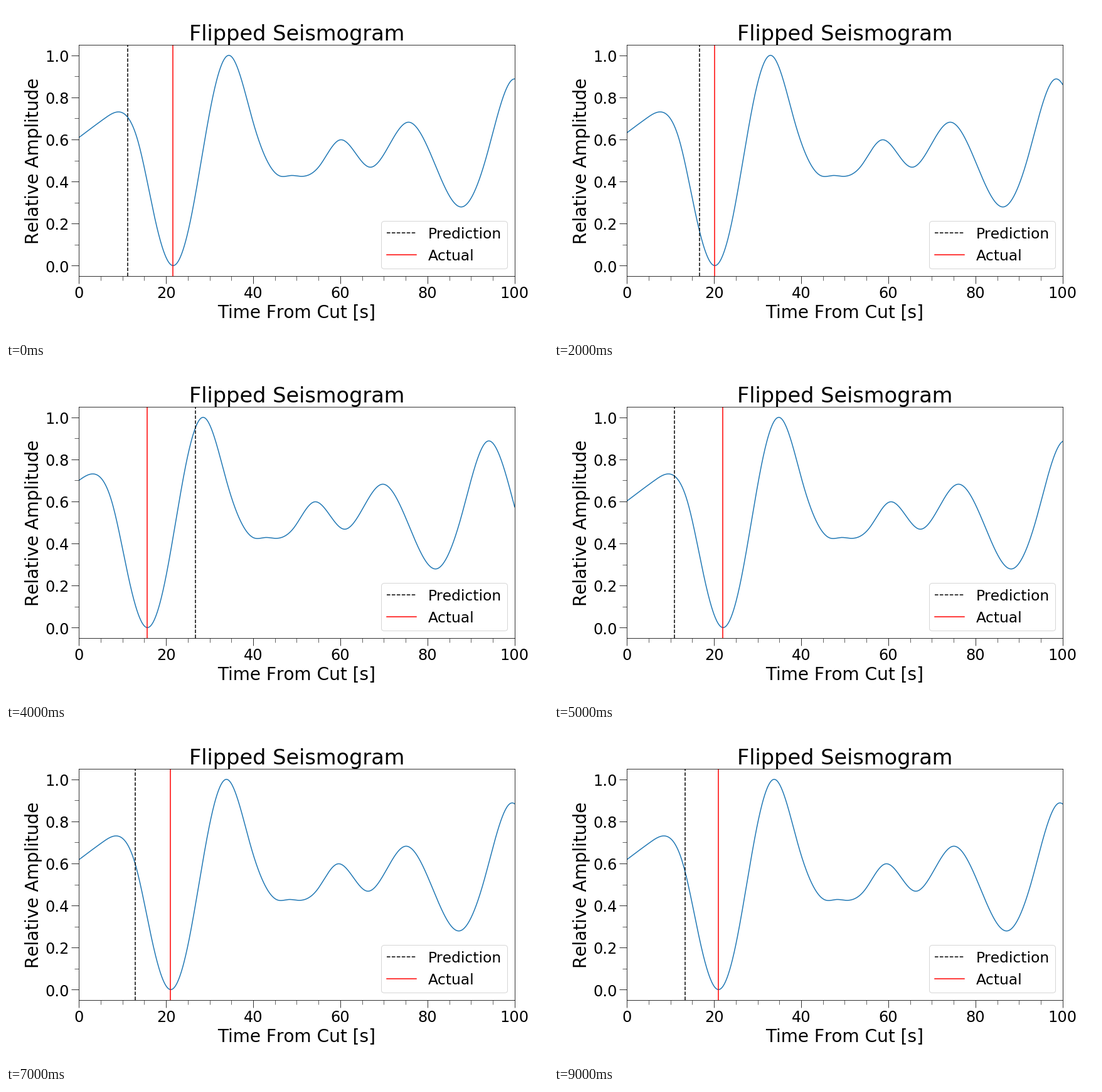
Recreate the animation shown at these times as a matplotlib script. Size 864 px wide and 533 px high, loop 10 s.

```python
import numpy as np
import matplotlib.pyplot as plt
from matplotlib.animation import FuncAnimation
from matplotlib.text import Text
from matplotlib.ticker import MultipleLocator
from matplotlib.transforms import ScaledTranslation

W, H, DPI = 864, 533, 72
plt.rcParams.update({
    "font.family": "DejaVu Sans",
    "font.size": 28,
    "text.kerning_factor": 6,
})

# Turning points and a few flank points: seconds from the trough, amplitude.
KEYS = np.array([
    (-22, .602), (-15.65, .7), (-12.4, .731), (-8.08, .598), (-4, .214),
    (0, 0), (4, .209), (9.1, .795), (12.95, 1), (18.4, .685), (24.6, .426),
    (27.2, .4285), (29.4, .4245), (33.7, .475), (38.4, .598), (45.3, .468),
    (54, .682), (60, .49), (66.3, .279), (72, .52), (78.05, .886),
    (84.35, .574),
])

# One cut per second: actual and predicted arrival.
PICKS = [
    (21.55, 11.2), (19.1, 20.7), (20.1, 16.6), (20.55, 14.65), (15.65, 26.75),
    (22, 10.9), (21.4, 11.8), (21, 12.95), (20.8, 13.8), (20.95, 13.35),
]


def natural_spline(x, y):
    """Return a function evaluating the natural cubic spline through x, y."""
    h = np.diff(x)
    n = len(x)
    a = np.eye(n)
    rhs = np.zeros(n)
    for i in range(1, n - 1):
        a[i, i - 1:i + 2] = h[i - 1], 2 * (h[i - 1] + h[i]), h[i]
        rhs[i] = 6 * ((y[i + 1] - y[i]) / h[i] - (y[i] - y[i - 1]) / h[i - 1])
    m = np.linalg.solve(a, rhs)

    def evaluate(t):
        i = np.clip(np.searchsorted(x, t) - 1, 0, n - 2)
        p, q = x[i + 1] - t, t - x[i]
        return ((m[i] * p**3 + m[i + 1] * q**3) / (6 * h[i])
                + (y[i] / h[i] - m[i] * h[i] / 6) * p
                + (y[i + 1] / h[i] - m[i + 1] * h[i] / 6) * q)

    return evaluate


wave = natural_spline(*KEYS.T)
time = np.linspace(0, 100, 1001)

fig = plt.figure(figsize=(W / DPI, H / DPI), dpi=DPI, facecolor="white")
left, right, top, bottom = 116.2, 810.8, 62, 431
ax = fig.add_axes([left / W, 1 - bottom / H,
                   (right - left) / W, (bottom - top) / H])
ax.set_xlim(0, 100)
ax.set_ylim(-0.05, 1.05)

trace, = ax.plot([], [], color="#1f77b4", lw=1.5)
predicted = ax.axvline(0, color="black", ls="--", lw=1.5, label="Prediction")
actual = ax.axvline(0, color="red", lw=1.5, label="Actual")

for axis, major, minor in ((ax.xaxis, 20, 5), (ax.yaxis, 0.2, 0.1)):
    axis.set_major_locator(MultipleLocator(major))
    axis.set_minor_locator(MultipleLocator(minor))
ax.tick_params(which="major", length=12, labelsize=24)
ax.tick_params(which="minor", length=7)

ax.set_title("Flipped Seismogram", fontsize="large")
ax.set_xlabel("Time From Cut [s]")
ax.set_ylabel("Relative Amplitude")
ax.legend(loc="lower right", fontsize="small")

# All text sits a little below its default baseline.
drop = ScaledTranslation(0, -0.8 / DPI, fig.dpi_scale_trans)
for text in fig.findobj(Text):
    text.set_transform(text.get_transform() + drop)


def update(i):
    t_actual, t_pred = PICKS[i]
    trace.set_data(time, wave(time - t_actual))
    predicted.set_xdata([t_pred, t_pred])
    actual.set_xdata([t_actual, t_actual])
    return trace, predicted, actual


anim = FuncAnimation(fig, update, frames=len(PICKS), interval=1000,
                     init_func=lambda: update(0), repeat=True, repeat_delay=0)
plt.show()
```
